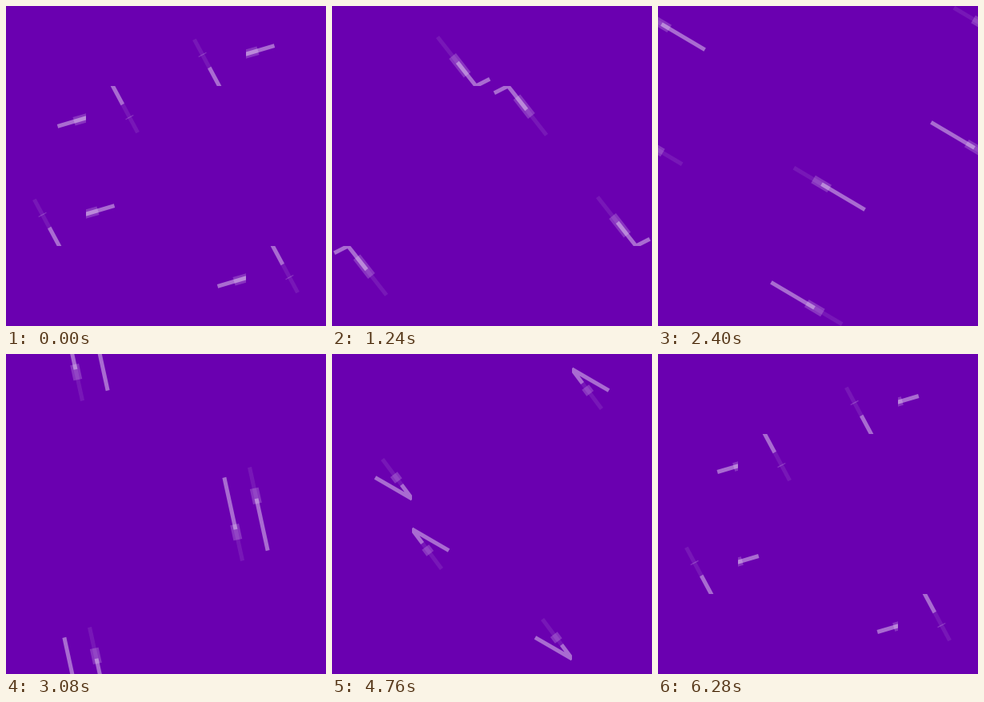
Recreate the animation shown at these times as an HTML page without scripts. Size 400 by 400 pixels, loop 6320 ms.

```html
<!DOCTYPE html>
<html lang="en">
<head>
<meta charset="utf-8">
<title>Bouncing dashes</title>
<style>
  html, body { margin: 0; height: 100%; overflow: hidden; background: #6a00b0; }
  svg { display: block; width: 100vw; height: 100vh; }

  /* one track, bouncing between the walls of a 200 x 200 room */
  .track {
    d: path("M-20 165.8 L0 160 L200 102 L120 0 L0 61 L200 179 L161 0 L60.5 200 L0 119 L140.5 200 L33.5 0 L22.6 -20.4");
    fill: none;
    stroke: #fff;
    stroke-width: 5;
  }
  .faint { stroke-opacity: .09; }
  .thick { stroke-opacity: .2; stroke-width: 11; }
  .bright { stroke-opacity: .42; }

  /* each dash is followed by the one for the next lap */
  .run .track, .rest { animation: 6320ms steps(158) -2ms infinite; }
  .run .faint { animation-name: faint; stroke-dasharray: 40 1559.8 40 4000; }
  .run .thick { animation-name: thick; }
  .run .bright { animation-name: bright; }
  @keyframes faint {
    from { stroke-dashoffset: 1632.8; }
    to { stroke-dashoffset: 33; }
  }
  @keyframes thick {
    from { stroke-dashoffset: 1589; stroke-dasharray: 37 1551.4 37 4000; }
    to { stroke-dashoffset: .6; stroke-dasharray: 37 1551.4 1 4000; }
  }
  @keyframes bright {
    from { stroke-dashoffset: 1592.3; stroke-dasharray: 50.6 1548.9 50.6 4000; }
    to { stroke-dashoffset: -7.2; stroke-dasharray: 50.6 1548.9 82.9 4000; }
  }

  /* the finished lap lingers for one step */
  .rest { animation-name: linger; }
  .rest .faint { stroke-dasharray: 0 1556.7 40 4000; }
  .rest .thick { stroke-dasharray: 0 1577.7 1.2 4000; }
  .rest .bright { stroke-dasharray: 0 1596.6 83 4000; }
  @keyframes linger {
    0%, .5% { opacity: 1; animation-timing-function: step-end; }
    .55%, 100% { opacity: 0; animation-timing-function: step-end; }
  }
</style>
</head>
<body>
<svg viewBox="0 0 400 400">
  <defs>
    <!-- contents are placed from the room's own corner -->
    <pattern id="room" x="100" y="100" width="200" height="200" patternUnits="userSpaceOnUse">
      <g class="run">
        <path class="track faint"/>
        <path class="track thick"/>
        <path class="track bright"/>
      </g>
      <g class="rest">
        <path class="track faint"/>
        <path class="track thick"/>
        <path class="track bright"/>
      </g>
    </pattern>
  </defs>
  <rect width="400" height="400" fill="#6a00b0"/>
  <!-- rooms in a checkerboard, every other one turned half round -->
  <path fill="url(#room)" d="M100 100h200v200h-200zM0 0h100v100h-100zM300 0h100v100h-100zM0 300h100v100h-100zM300 300h100v100h-100z"/>
  <path fill="url(#room)" transform="rotate(180 200 200)" d="M100 0h200v100h-200zM0 100h100v200h-100zM300 100h100v200h-100zM100 300h200v100h-200z"/>
</svg>
</body>
</html>
```
